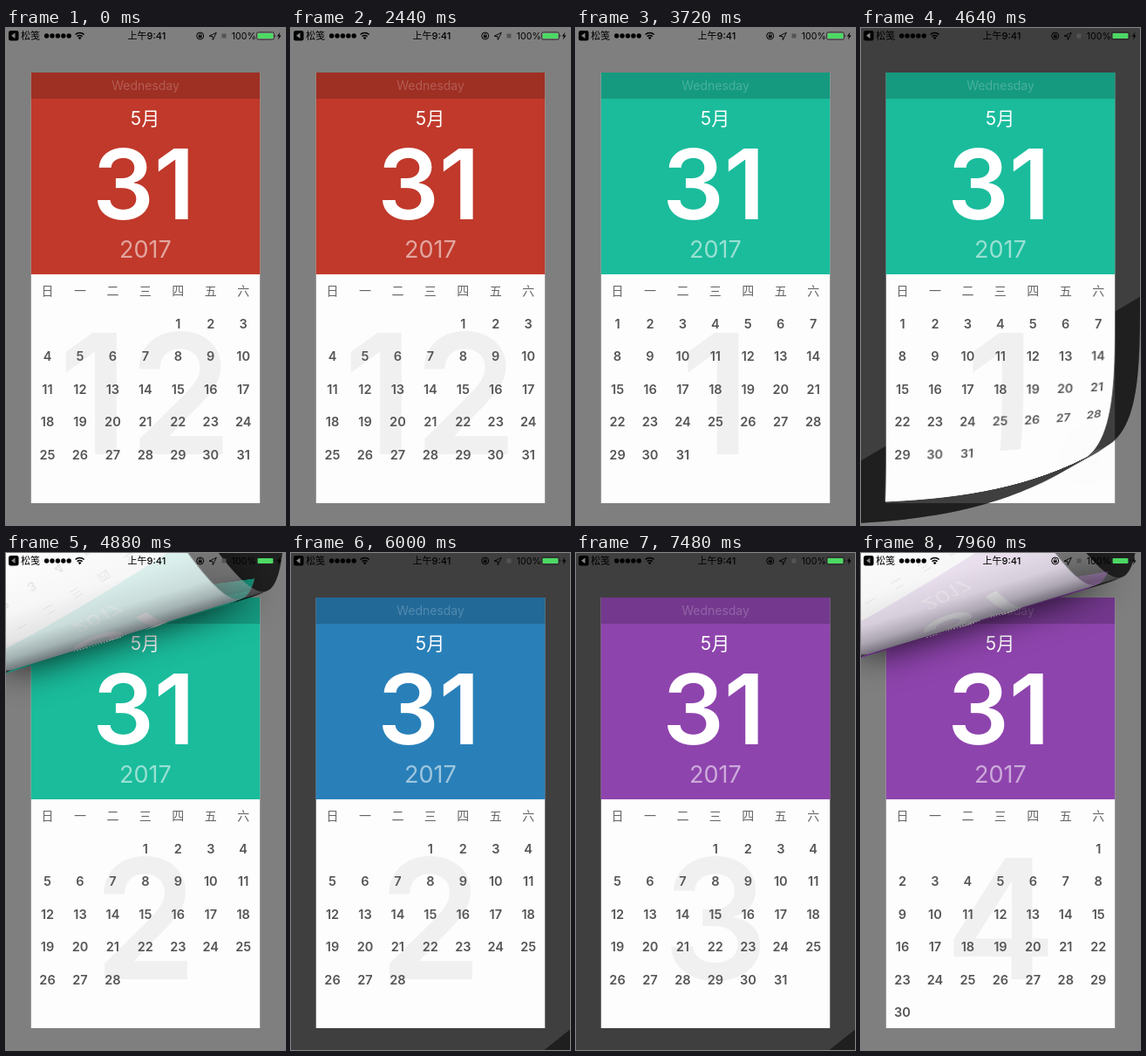
These frames come from a looping animation (320 px wide and 569 px high, 8000 ms). An HTML page with a canvas:

```html
<!DOCTYPE html>
<html lang="zh">
<head>
<meta charset="utf-8">
<title>Calendar page curl</title>
<style>
  html, body { margin: 0; width: 100%; height: 100%; overflow: hidden; background: #fff; }
  canvas, svg { position: absolute; left: 0; top: 0; width: 320px; height: 569px; display: block; }
  text { font: 12px Inter, "Noto Sans CJK SC", "Noto Sans CJK", sans-serif; }
</style>
</head>
<body>
<canvas id="stage"></canvas>
<svg viewBox="0 0 320 569">
  <rect x="3" y="3" width="11.5" height="11.5" rx="2.5"/>
  <path d="M10.5 5.5V12L6 8.7z" fill="#888"/>
  <text x="17" y="12.8" style="font-size:11px">松笺</text>
  <g id="signal"></g>
  <g fill="none" stroke="#000" stroke-width="1.5">
    <path d="M79.6 7.6a7 7 0 0 1 10 0M81.6 9.7a4.2 4.2 0 0 1 6 0"/>
  </g>
  <path d="M84.6 13.2l-1.9-2a2.7 2.7 0 0 1 3.8 0z"/>
  <text x="161.5" y="12.8" text-anchor="middle" style="font-size:11px;font-weight:500">上午9:41</text>
  <g fill="none" stroke="#000">
    <circle cx="222.7" cy="9" r="4"/>
    <path d="M221.4 8.5v-.7a1.3 1.3 0 0 1 2.6 0v.7" stroke-width=".8"/>
    <path d="M233 9.3l8.3-4-4 8.3-.4-4z" stroke-width=".9"/>
  </g>
  <rect x="220.8" y="8.4" width="3.8" height="2.8"/>
  <rect x="247.5" y="6.5" width="5" height="5" fill="#555"/>
  <text x="258.8" y="12.8" style="font-size:10.6px">100%</text>
  <rect x="287.5" y="4.8" width="20" height="8.4" rx="1.8" fill="none" stroke="#222" stroke-width=".8"/>
  <rect x="288.6" y="5.9" width="17.8" height="6.2" rx=".8" fill="#4cd964"/>
  <path d="M308.6 7.4q1.6 1.6 0 3.2z"/>
  <path d="M314.4 4.8l-3.5 4.7h2.1l-1 3.9 3.6-4.9h-2.2z"/>
</svg>
<script>
const W = 320, H = 569, K = window.devicePixelRatio || 1;
const LOOP = 8000, STEP = 40, CURL = 700, R = 128, SLICES = 24;
const FONT = 'Inter, "Noto Sans CJK SC", "Noto Sans CJK", sans-serif';
const RED = '#c0392b', TEAL = '#1abc9c', BLUE = '#2980b9', PURPLE = '#8e44ad';

// month, weekday of the 1st, number of days, header colour
const months = [
  [12, 4, 31, RED], [1, 0, 31, TEAL], [2, 3, 28, TEAL], [3, 3, 31, BLUE], [4, 6, 30, PURPLE]
];
const flips = [2690, 4401, 6000, 7470];

document.getElementById('signal').innerHTML =
  [0, 1, 2, 3, 4].map(i => `<circle cx="${46.6 + i * 6.4}" cy="9" r="2.7"/>`).join('');

function layer(canvas = document.createElement('canvas')) {
  canvas.width = Math.round(W * K);
  canvas.height = Math.round(H * K);
  const g = canvas.getContext('2d');
  g.scale(K, K);
  return g;
}

function rect(g, color, x, y, w, h) {
  g.fillStyle = color;
  g.fillRect(x, y, w, h);
}

function label(g, str, x, y, size, weight, color) {
  g.font = `${weight} ${size}px ${FONT}`;
  g.fillStyle = color;
  g.fillText(str, x, y);
}

function makePage([month, first, days], color) {
  const g = layer(), x = 28.8, w = W - 2 * x;
  g.textAlign = 'center';
  rect(g, 'rgba(0,0,0,.5)', 0, 0, W, H);
  g.clearRect(x, 51, w, 493);
  rect(g, '#fdfdfd', x, 51, w, 493);
  rect(g, color, x, 51, w, 231);
  rect(g, 'rgba(0,0,0,.18)', x, 51, w, 30);
  label(g, 'Wednesday', 160, 71, 14, 400, 'rgba(255,255,255,.22)');
  label(g, '5月', 159.5, 111, 21, 400, '#fff');
  label(g, '31', 158, 219, 111, 600, '#fff');
  label(g, '2017', 160, 263, 27, 400, 'rgba(255,255,255,.55)');
  label(g, month, 160, 488, 191, 600, '#f0f0f0');
  const col = i => 47.5 + i * 37.45;
  [...'日一二三四五六'].forEach((s, i) => label(g, s, col(i), 306, 14, 400, '#666'));
  for (let d = 1; d <= days; d++) {
    const i = first + d - 1;
    label(g, d, col(i % 7), 344 + Math.floor(i / 7) * 37.45, 14.5, 600, '#555');
  }
  return g.canvas;
}

function makeBack(page) {
  const g = layer();
  g.drawImage(page, 0, 0, W, H);
  g.globalCompositeOperation = 'source-atop';
  rect(g, 'rgba(255,255,255,.87)', 0, 0, W, H);
  return g.canvas;
}

const rest = months.map(m => makePage(m, m[3]));
// the header takes its next colour just before the page lifts
const lifted = flips.map((_, i) => makePage(months[i], months[i + 1][3]));
const backs = lifted.map(makeBack);

const ctx = layer(document.getElementById('stage'));
const front = layer(), back = layer();

// trace the band between two lines square to n
function band(g, [nx, ny], q0, q1) {
  const far = 2000;
  g.beginPath();
  for (const [q, s] of [[q0, -far], [q0, far], [q1, far], [q1, -far]])
    g.lineTo(nx * q - ny * s, ny * q + nx * s);
  g.closePath();
}

// map page distances d0..d1 past the fold to screen distances e0..e1
function warp(g, img, n, c, d0, d1, e0, e1) {
  const [nx, ny] = n;
  const k = (e1 - e0) / (d1 - d0), b = c + e0 - k * (c + d0), m = k - 1;
  g.save();
  g.transform(1 + m * nx * nx, m * nx * ny, m * nx * ny, 1 + m * ny * ny, nx * b, ny * b);
  band(g, n, c + d0, c + d1 + 1.5 / Math.abs(k));
  // erase and add with equal coverage, so that slices join without seams
  g.fillStyle = '#000';
  g.globalCompositeOperation = 'destination-out';
  g.fill();
  g.clip();
  g.globalCompositeOperation = 'lighter';
  g.drawImage(img, 0, 0, W, H);
  g.restore();
}

function roll(g, img, n, c, from) {
  const step = Math.PI / 2 / SLICES;
  for (let i = 0; i < SLICES; i++) {
    const a = from + i * step, b = a + step;
    warp(g, img, n, c, a * R, b * R, Math.sin(a) * R, Math.sin(b) * R);
  }
}

function shadeBack(n, c) {
  const [nx, ny] = n;
  const grad = back.createLinearGradient(nx * c, ny * c, nx * (c + R), ny * (c + R));
  for (const [x, a] of [[0, 0], [.5, .03], [.75, .11], [.9, .3], [1, .55]])
    grad.addColorStop(x, `rgba(15,15,25,${a})`);
  back.globalCompositeOperation = 'source-atop';
  rect(back, grad, 0, 0, W, H);
  back.globalCompositeOperation = 'source-over';
}

function drawCurl(i, time) {
  const p = Math.max(.022, (1 - Math.cos(Math.PI * time)) / 2);
  const angle = (14.5 + 25 * (1 - p) ** 1.5) * Math.PI / 180;
  const n = [Math.sin(angle), Math.cos(angle)];
  const c = 644 - 830 * p, half = Math.PI * R;

  front.clearRect(0, 0, W, H);
  warp(front, lifted[i], n, c, -1500, 0, -1500, 0);
  roll(front, lifted[i], n, c, 0);

  back.clearRect(0, 0, W, H);
  roll(back, backs[i], n, c, Math.PI / 2);
  warp(back, backs[i], n, c, half, half + 1500, 0, -1500);
  shadeBack(n, c);

  // the raised part darkens what shows through its clear margin
  ctx.save();
  band(ctx, n, c, c + 1500);
  ctx.clip();
  ctx.drawImage(front.canvas, 0, 0, W, H);
  ctx.restore();
  ctx.drawImage(front.canvas, 0, 0, W, H);

  ctx.save();
  ctx.shadowColor = 'rgba(0,0,0,.9)';
  ctx.shadowBlur = 44 * K;
  ctx.drawImage(back.canvas, 0, 0, W, H);
  ctx.restore();
}

function draw(t) {
  const begun = flips.filter(s => t >= s).length;
  ctx.clearRect(0, 0, W, H);
  ctx.drawImage(rest[begun], 0, 0, W, H);
  if (!begun) return;
  const time = (t - flips[begun - 1]) / CURL;
  if (time < 1) drawCurl(begun - 1, time);
}

let origin, shown = -1;
function tick() {
  const now = performance.now();
  origin ??= now;
  const t = Math.floor((now - origin) % LOOP / STEP) * STEP;
  if (t !== shown) draw(shown = t);
  requestAnimationFrame(tick);
}
tick();
</script>
</body>
</html>
```
